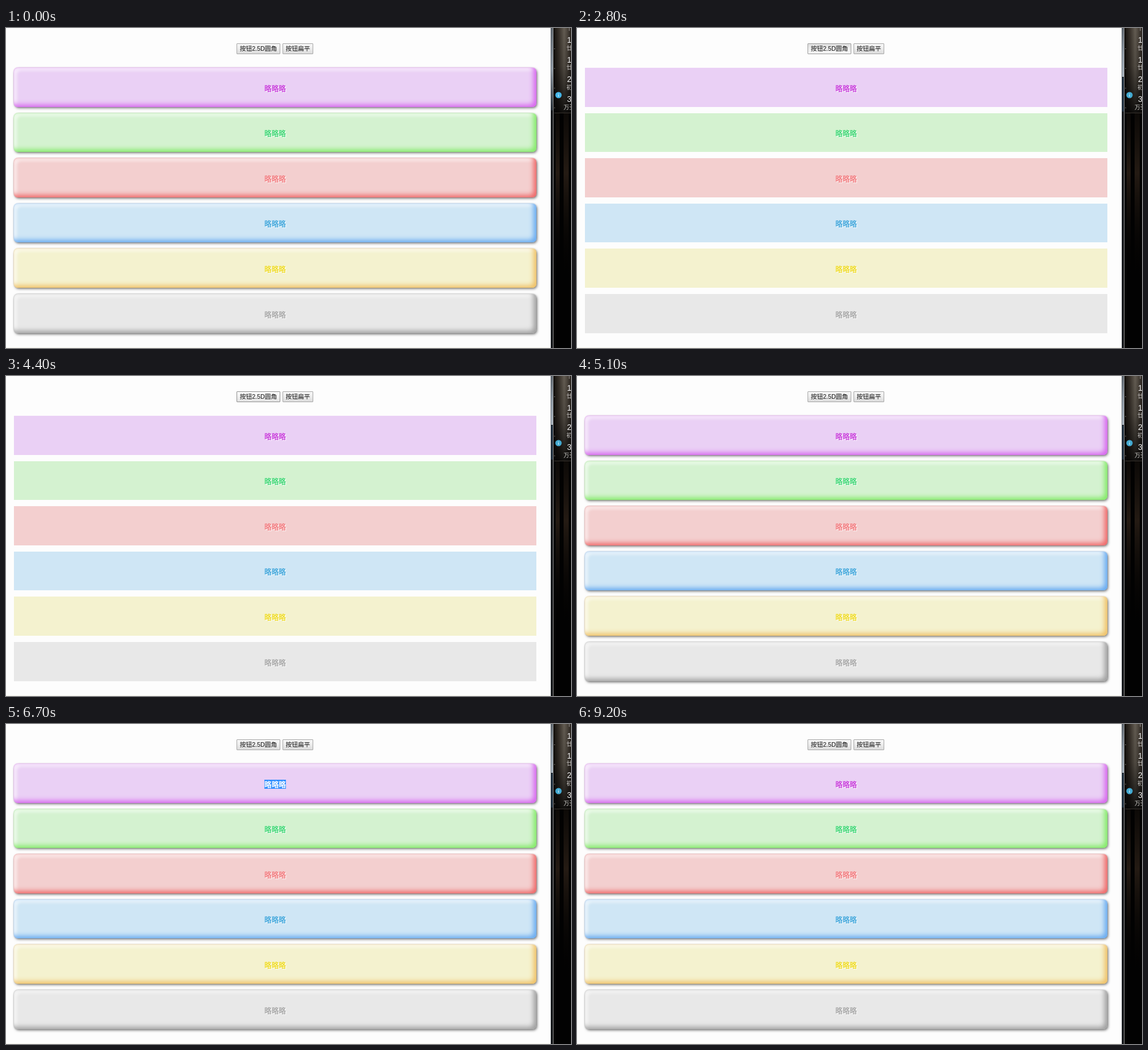
An HTML page with a canvas for the animation above (9600 ms loop, 995 by 563 pixels).

```html
<!DOCTYPE html>
<html lang="zh">
<head>
<meta charset="utf-8">
<title>按钮</title>
<style>
html, body { margin: 0; width: 100%; height: 100%; overflow: hidden; }
#stage {
  position: relative; width: 995px; height: 563px; overflow: hidden;
  background: #fdfdfd; font-family: "Liberation Sans", "Noto Sans CJK SC", "Noto Sans CJK", sans-serif;
}
#stage::after {
  content: ""; position: absolute; left: 0; top: 562px; width: 959px; height: 1px; background: #f8f5ec;
}
#side { position: absolute; left: 959px; top: 0; }
.tool {
  position: absolute; top: 27px; height: 19px; box-sizing: border-box;
  border: 1px solid #a5a5a5; border-radius: 1px; color: #111;
  background: linear-gradient(#f7f7f7, #efefef 40%, #dcdcdc);
  font-size: 10.75px; line-height: 17px; text-align: center; white-space: nowrap;
}
.tool.hover { border-color: #8f8f8f; background: linear-gradient(#fafafa, #f3f3f3 40%, #e2e2e2); }
.tool.down { border-color: #9a9a9a; background: linear-gradient(#dedede, #ececec 45%, #f5f5f5); }
.bar {
  position: absolute; left: 14px; width: 920px; height: 68.5px; border-radius: 7px;
  background: var(--fill); color: var(--ink);
  font: bold 12.7px/69px "Noto Sans CJK SC", "Noto Sans CJK", sans-serif; text-align: center;
  text-shadow: 1px 1px 1px #fff;
  box-shadow: inset -5px -4px 8px var(--edge), inset 5px 5px 5px rgba(255,255,255,.62),
    1.5px 2px 4.5px rgba(50,50,50,.62), 0 0 2px var(--edge);
}
.bar.down {
  box-shadow: inset 4px 4px 8px var(--edge), inset -5px -5px 6px rgba(255,255,255,.62),
    0 0 2px var(--edge);
}
.flat .bar { border-radius: 0; box-shadow: none; }
.bar span { display: inline-block; height: 16px; line-height: 16px; vertical-align: middle; position: relative; top: -1px; }
.bar.picked span { background: #3390ff; color: #fff; text-shadow: none; }
</style>
</head>
<body>
<div id="stage">
  <div class="tool" style="left:406px;width:77px">按钮2.5D圆角</div>
  <div class="tool" style="left:487px;width:54px">按钮扁平</div>
  <canvas id="side" width="36" height="563"></canvas>
</div>
<script>
const LOOP = 9600;
const stage = document.getElementById('stage');
const tools = [...document.querySelectorAll('.tool')];
const ctx = document.getElementById('side').getContext('2d');

// fill, edge, ink
const palette = [
  ['#ead0f5', '#d765ee', '#c944dc'],
  ['#d4f2d0', '#83ea68', '#45d878'],
  ['#f3cfcf', '#ee6868', '#f27d80'],
  ['#cfe6f5', '#68aaf0', '#45a8dc'],
  ['#f4f2cf', '#efc066', '#efdc2c'],
  ['#e8e8e8', '#a0a0a0', '#a9a9a9']
];
const bars = palette.map(([fill, edge, ink], i) => {
  const bar = document.createElement('div');
  bar.className = 'bar';
  bar.style.top = 70 + i * 79.6 + 'px';
  bar.style.setProperty('--fill', fill);
  bar.style.setProperty('--edge', edge);
  bar.style.setProperty('--ink', ink);
  bar.innerHTML = '<span>略略略</span>';
  stage.append(bar);
  return bar;
});

// [start, state of first tool, state of second tool]
const pointer = [
  [0, '', ''], [1000, '', 'hover'], [1300, 'hover', ''], [1500, '', 'hover'],
  [1700, '', 'down'], [2000, '', 'hover'], [2300, 'hover', ''], [2800, 'down', ''],
  [2900, 'hover', ''], [3400, '', 'hover'], [3700, '', 'down'], [3900, '', 'hover'],
  [4400, 'hover', ''], [4600, 'down', ''], [4700, 'hover', ''], [5100, '', '']
];
const within = (t, spans) => spans.some(([a, b]) => t >= a && t < b);

function rect(x, y, w, h, color) {
  ctx.fillStyle = color;
  ctx.fillRect(x, y, w, h);
}

function gradient(x0, y0, x1, y1, stops) {
  const g = ctx.createLinearGradient(x0, y0, x1, y1);
  stops.forEach(([at, color]) => g.addColorStop(at, color));
  return g;
}

function label(text, x, y, size, color) {
  ctx.font = `${size}px "Liberation Sans", "Noto Sans CJK SC", "Noto Sans CJK", sans-serif`;
  ctx.fillStyle = color;
  ctx.fillText(text, x, y);
}

function drawSide(later) {
  rect(0, 0, 36, 563, '#020202');
  // dim backdrop: lit upper panel, fading columns below
  rect(6, 0, 30, 149, gradient(6, 0, 36, 0,
    [[0, '#17130f'], [.3, '#3a332c'], [.6, '#645d53'], [.8, '#4a433b'], [1, '#29231e']]));
  rect(6, 0, 30, 149, gradient(0, 0, 0, 149, [[0, 'rgba(0,0,0,0)'], [.45, 'rgba(0,0,0,.2)'], [1, 'rgba(0,0,0,.82)']]));
  rect(6, 149, 30, 1, '#39342f');
  const fade = gradient(0, 150, 0, 450, [[0, 'rgba(38,28,20,.3)'], [.35, 'rgba(48,35,25,.75)'], [1, 'rgba(0,0,0,0)']]);
  rect(9, 150, 7, 300, fade);
  rect(23, 150, 9, 300, fade);

  // window edge
  rect(0, 0, 1, 563, '#777b80');
  rect(1, 0, 3, 563, '#090b0e');
  rect(1, 0, 3, later ? 86 : 145, gradient(0, 0, 0, later ? 86 : 145,
    [[0, '#59616a'], [.5, '#8c98a4'], [1, later ? '#a8b4bf' : '#18212a']]));
  if (later) rect(1, 87, 3, 60, '#172838');
  rect(4, 0, 1, 563, '#a6a6a6');

  ctx.textBaseline = 'middle';
  ['1', '1', '2', '3'].forEach((digit, i) => {
    const y = 22 + i * 34.7;
    label(digit, 29, y, 14, '#f1f1f1');
    label(['廿', '廿', '初', '万圣'][i], i === 3 ? 23 : 28, y + 14, 10, '#c9c7c4');
    rect(6, y + 14, 2, 1, '#77736e');
  });
  label('十', 28, 1, 10, '#b5b1ad');

  ctx.fillStyle = later ? '#42a9d0' : '#45b6e8';
  ctx.beginPath();
  ctx.arc(14, 118, 5.6, 0, Math.PI * 2);
  ctx.fill();
  rect(13.5, 117, 1, 4, '#e9f7fc');
  rect(13.5, 115, 1, 1, '#e9f7fc');
}

let drawn;
function render(t) {
  const [, first, second] = pointer.filter(p => p[0] <= t).pop();
  tools[0].className = 'tool ' + first;
  tools[1].className = 'tool ' + second;
  stage.className = within(t, [[2000, 2900], [3900, 4700]]) ? 'flat' : '';
  bars[0].classList.toggle('down', within(t, [[5700, 6100], [6600, 6700], [8000, 8200]]));
  bars[0].classList.toggle('picked', within(t, [[6700, 8200]]));
  const later = t >= 1700;
  if (later !== drawn) drawSide(drawn = later);
}

const start = performance.now();
function tick() {
  render((performance.now() - start) % LOOP);
  requestAnimationFrame(tick);
}
render(0);
requestAnimationFrame(tick);
</script>
</body>
</html>
```
